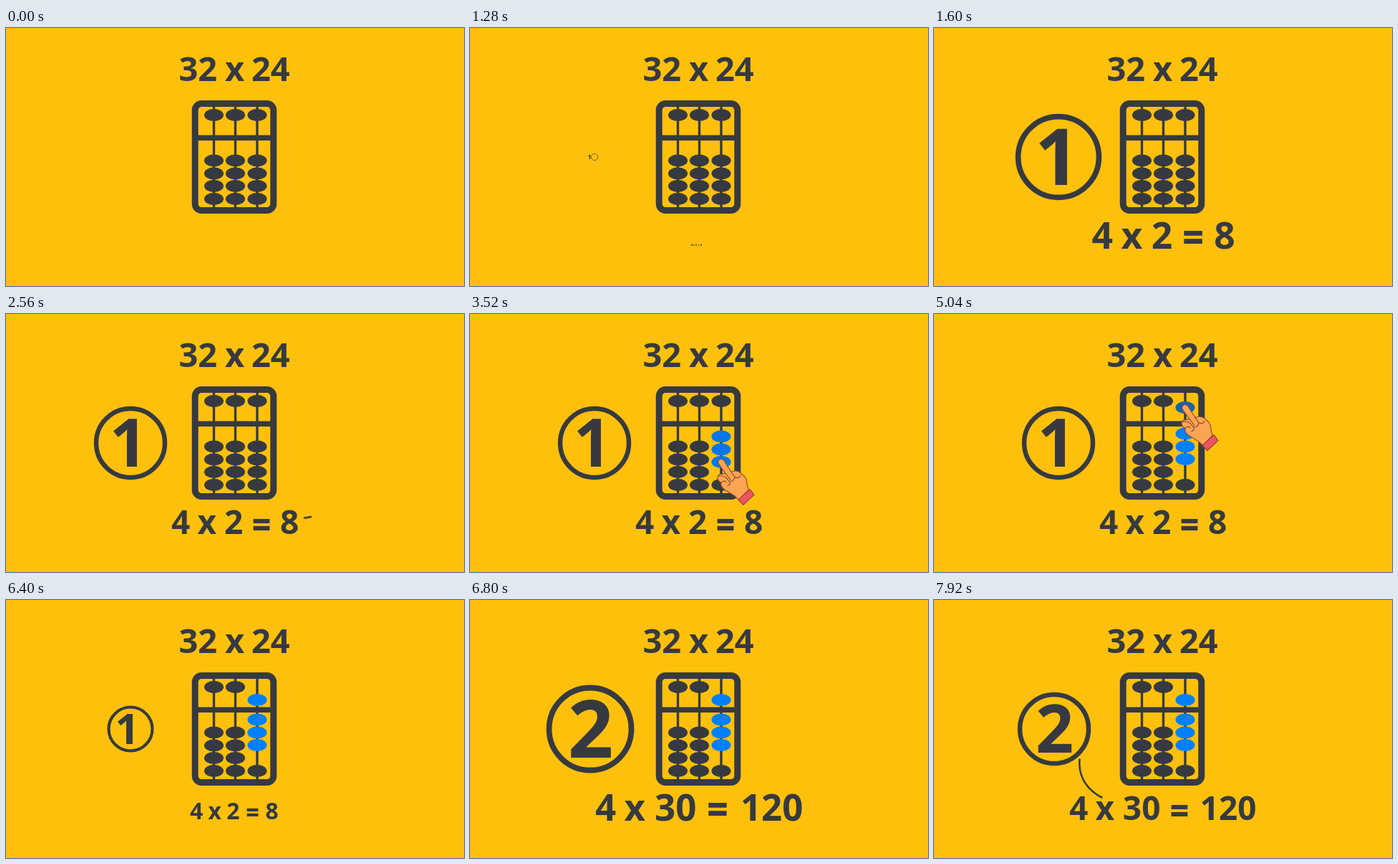
An HTML page with a canvas for the animation above (8000 ms loop, 640 by 360 pixels).

```html
<!DOCTYPE html>
<html lang="en">
<head>
<meta charset="utf-8">
<title>Abacus multiplication</title>
<style>
html, body { margin: 0; width: 100%; height: 100%; overflow: hidden; background: #ffc00c; }
canvas { display: block; width: 640px; height: 360px; }
</style>
</head>
<body>
<canvas id="stage" width="640" height="360"></canvas>
<script>
const ctx = document.getElementById('stage').getContext('2d');
const LOOP = 8000;
const BG = '#ffc00c', DARK = '#363a40';
const INK = [54, 58, 64], BLUE = [0, 127, 255];
const COLS = [290.5, 320.5, 351];
const ROWS = [185, 203, 220.5, 238.5];

const clamp = v => Math.max(0, Math.min(1, v));
const span = (t, a, b) => clamp((t - a) / (b - a));
const ease = p => (1 - Math.cos(Math.PI * p)) / 2;
const move = (t, a, b) => ease(span(t, a, b));
const tint = p => `rgb(${INK.map((c, i) => Math.round(c + (BLUE[i] - c) * clamp(p * 1.12)))})`;

// Grow past full size, then settle back to it
function pop(t, start, peak) {
  return t < start + 190
    ? peak * move(t, start, start + 190)
    : peak + (1 - peak) * move(t, start + 190, start + 460);
}

const shrink = (t, power) => 1 - Math.pow(span(t, 6330, 6480), power);

// Centre the visible part of a word on x
function word(str, x, y, size, weight = 700) {
  ctx.font = `${weight} ${size}px "Open Sans", "Noto Sans", sans-serif`;
  const m = ctx.measureText(str);
  ctx.fillText(str, x + (m.actualBoundingBoxLeft - m.actualBoundingBoxRight) / 2, y);
}

function scaled(x, y, s, draw) {
  if (s < 0.005) return;
  ctx.save();
  ctx.translate(x, y);
  ctx.scale(s, s);
  draw();
  ctx.restore();
}

function equation(words, s) {
  scaled(316, 304, s, () => {
    ctx.fillStyle = DARK;
    for (const [str, x] of words) {
      const sign = str === '=';
      word(str, x - 316, sign ? 5.5 : 3.2, 46, sign ? 800 : 700);
    }
  });
}

function badge(digit, digitX, ringX, s) {
  scaled(ringX, 180, s, () => {
    ctx.strokeStyle = DARK;
    ctx.lineWidth = 6.5;
    ctx.beginPath();
    ctx.arc(0, 0, 48, 0, 2 * Math.PI);
    ctx.stroke();
  });
  scaled(digitX, 180, s, () => {
    ctx.fillStyle = DARK;
    word(digit, 0, 33, 93);
  });
}

function bead(x, y, color) {
  ctx.fillStyle = color;
  ctx.beginPath();
  ctx.ellipse(x, y, 13.5, 8.5, 0, 0, 2 * Math.PI);
  ctx.fill();
}

function abacus(up, down) {
  ctx.fillStyle = DARK;
  for (const x of COLS) ctx.fillRect(x - 1.7, 106, 3.4, 148);
  ctx.fillRect(265, 149.5, 108, 7.5);
  ctx.strokeStyle = DARK;
  ctx.lineWidth = 9;
  ctx.beginPath();
  ctx.roundRect(264.2, 105.5, 109.6, 149, 9);
  ctx.stroke();
  COLS.forEach((x, col) => {
    const last = col === 2;
    const top = last ? down : 0;
    bead(x, 121.5 + 18 * top, tint(top));
    ROWS.forEach((y, row) => {
      const p = last && row < 3 ? up : 0;
      bead(x, y - 18 * p, tint(p));
    });
  });
}

const HAND = new Path2D('M-4 2Q-5-4 0-4Q3-4 5 0L14 14Q19 11 25 14Q32 18 35 24Q36 31 38 39L25 53' +
  'Q18 46 10 42Q4 39 1 35Q-1 32 0 29Q-5 26 -5 22Q-4 17 0 17L6 16Z');
const FOLDS = new Path2D('M6 16L13 25M0 29Q3 25 7 28M-4 20Q2 18 7 22L12 28Q13 32 9 33' +
  'M14 14L19 21Q18 27 13 27M19 21Q25 24 27 19');
const CUFF = new Path2D('M24 53L40 38L46 46L31 60Z');

function hand(x, y, alpha) {
  if (alpha <= 0) return;
  ctx.save();
  ctx.translate(x, y);
  ctx.globalAlpha = alpha;
  ctx.lineJoin = ctx.lineCap = 'round';
  ctx.lineWidth = 1.2;
  ctx.fillStyle = '#fba453';
  ctx.strokeStyle = '#91502f';
  ctx.fill(HAND);
  ctx.stroke(HAND);
  ctx.stroke(FOLDS);
  ctx.fillStyle = '#e9565f';
  ctx.strokeStyle = '#a8383f';
  ctx.fill(CUFF);
  ctx.stroke(CUFF);
  ctx.restore();
}

// The stretch of a cubic curve between two fractions
function stroke(pts, from, to, width) {
  if (to <= from) return;
  const at = (u, k) => {
    const v = 1 - u;
    return v * v * v * pts[0][k] + 3 * v * v * u * pts[1][k] +
      3 * v * u * u * pts[2][k] + u * u * u * pts[3][k];
  };
  ctx.strokeStyle = DARK;
  ctx.lineWidth = width;
  ctx.lineCap = ctx.lineJoin = 'round';
  ctx.beginPath();
  for (let i = 0; i <= 40; i++) {
    const u = from + (to - from) * i / 40;
    ctx.lineTo(at(u, 0), at(u, 1));
  }
  ctx.stroke();
}

const TO_BEADS = [[417, 284.5], [482, 277], [512, 200], [388, 196]];
const TO_SUM = [[203.5, 222.5], [201.5, 244], [212, 264], [234.5, 275.5]];
const FIRST = [['4', 244], ['x', 281], ['2', 318], ['=', 357], ['8', 396]];
const SECOND = [['4', 202], ['x', 239], ['30', 290], ['=', 343], ['120', 411.5]];

function draw(t) {
  ctx.fillStyle = BG;
  ctx.fillRect(0, 0, 640, 360);

  ctx.fillStyle = DARK;
  word('32', 268.3, 74, 47);
  word('x', 319.5, 74, 47);
  word('24', 370.3, 74, 47);

  const up = move(t, 3106, 3706);
  const down = move(t, 4740, 5340);
  abacus(up, down);

  if (t < 6480) {
    badge('1', 166.5, 174, pop(t, 1250, 1.5) * shrink(t, 1.35));
    equation(FIRST, pop(t, 1250, 1.35) * shrink(t, 1.58));
  } else {
    badge('2', 169, 168, pop(t, 6490, 1.34));
    equation(SECOND, pop(t, 6490, 1.19));
  }

  stroke(TO_BEADS, move(t, 3060, 3470), span(t, 2540, 2980), 2.6);
  stroke(TO_SUM, 0, span(t, 7825, 7920), 2.6);

  hand(351, 220.5 - 18 * up, span(t, 2990, 3130) * (1 - span(t, 3740, 3990)));
  hand(351, 121.5 + 18 * down, span(t, 4610, 4760) * (1 - span(t, 5390, 5670)));
}

function frame() {
  draw(performance.now() % LOOP);
  requestAnimationFrame(frame);
}
frame();
</script>
</body>
</html>
```
